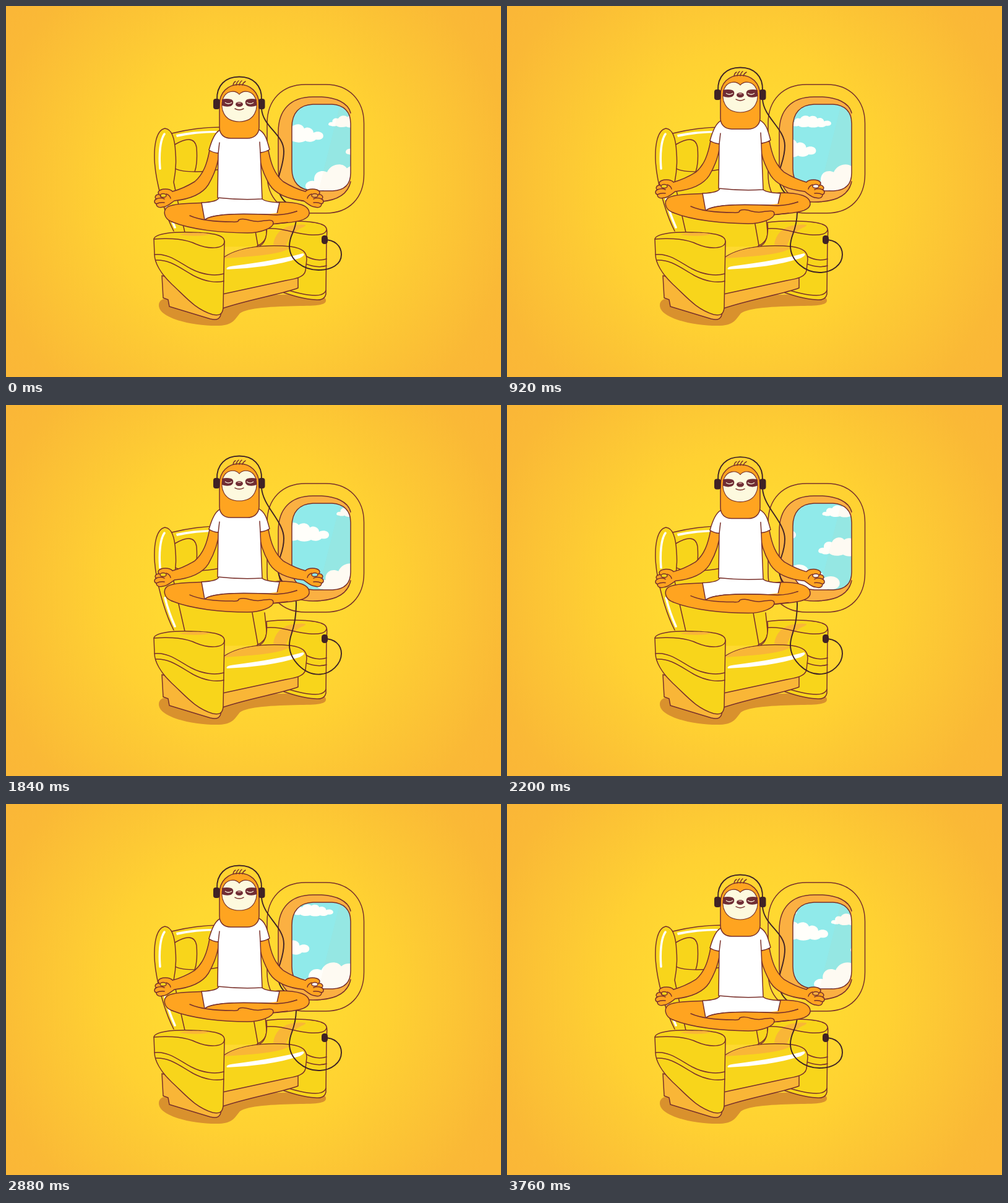
These frames come from a looping animation (800x600 px, 3800 ms). An HTML page:

```html
<!DOCTYPE html>
<html lang="en">
<head>
<meta charset="utf-8">
<title>Meditating sloth</title>
<style>
  html, body { margin: 0; width: 100%; height: 100%; overflow: hidden; background: #fab936; }
  svg { display: block; }
  .line { fill: none; stroke: #78302b; stroke-width: 1.5; stroke-linecap: round; stroke-linejoin: round; }
  .yellow { fill: #f8d51b; }
  .amber { fill: #f9b637; }
  .fur { fill: #ffa420; }
  .white { fill: #fff; }
  .dark { fill: #3f2226; }
  .cord { fill: none; stroke: #3f2226; stroke-width: 1.9; stroke-linecap: round; }
  .patch { fill: #702d35; }
  .shine { stroke: #fff; stroke-width: 3.5; }
</style>
</head>
<body>
<svg width="800" height="600" viewBox="0 0 800 600">
  <defs>
    <radialGradient id="glow" gradientUnits="userSpaceOnUse" cx="391" cy="300" r="480">
      <stop offset="0" stop-color="#ffda30"/>
      <stop offset=".3" stop-color="#ffd831"/>
      <stop offset=".48" stop-color="#ffd132"/>
      <stop offset=".6" stop-color="#fdca34"/>
      <stop offset=".9" stop-color="#fab936"/>
      <stop offset="1" stop-color="#fab737"/>
    </radialGradient>
    <path id="glass" d="M496,159H527C546,160 557,171 557,190V270C557,288 547,298 528,299H497C474,298 462,285 462,263V196C462,173 474,160 496,159Z"/>
    <clipPath id="pane"><use href="#glass"/></clipPath>
    <path id="cloud" d="M6,26C-4,26 0,15 9,17C8,8 16,5 22,8C26,-1 38,-2 42,4C48,-1 58,1 60,8C66,4 75,8 75,15C82,11 91,14 91,20C91,26 84,27 79,26C74,31 66,30 62,28C55,32 45,31 40,28C32,31 22,30 18,26C14,28 9,28 6,26Z"/>
    <g id="arm">
      <path class="line fur" fill-rule="evenodd" d="M329,233C325,255 319,272 305,284C292,292 280,297 269,300C266,296 257,295 251,297C245,299 245,303 248,305C242,304 239,310 243,312C239,314 239,319 243,320C243,325 248,327 254,325C260,325 265,320 272,315C300,312 318,303 327,289C338,270 343,255 344,238ZM249,306.500a5,3 0 1 0 10,0a5,3 0 1 0 -10,0"/>
      <path class="line" d="M243,312Q250,309 256,312M243,320Q249,317 256,318M259,304Q265,306 266,311"/>
    </g>
  </defs>

  <rect width="800" height="600" fill="url(#glow)"/>

  <g id="window">
    <path class="line" d="M484,127H517C554,127 578.500,152 578.500,190V272C578.500,311 554,335 517,335H484C446,335 422,311 422,272V190C422,152 446,127 484,127Z"/>
    <path class="line" style="fill:#fbb042" d="M557,173C553,156 532,148 510,147H496C460,147 440,168 440,204V262C440,298 461,317 496,317C528,317 552,308 557,284"/>
    <use href="#glass" fill="#90eaea"/>
    <g id="sky" fill="#fffefa" clip-path="url(#pane)"></g>
    <path clip-path="url(#pane)" fill="#e8a868" opacity=".05" d="M540,159L505,299H557V159Z"/>
    <use href="#glass" class="line"/>
  </g>

  <g id="chair">
    <path fill="#d9912d" d="M247,484C247,472 262,470 290,472L470,466C500,464 518,468 517,477C516,484 500,485 475,485C430,486 390,488 378,497C370,506 368,516 344,517C305,518 247,506 247,484Z"/>

    <path class="yellow" d="M262,206C300,197 345,195 400,196L418,338L421,366C422,380 413,386 406,389L290,390L276,330L268,300Z"/>
    <path class="line" d="M268,206C300,198 325,196 346,196M273,224C290,214 305,211 308,229C309,243 309,257 305,268M272,262C282,269 315,270 346,264M418,336L421,364C422,378 413,385 406,388M398,336L407,387"/>
    <path class="white" d="M275,208Q307,201 341,202L340,205Q307,205 276,212Z"/>
    <path class="yellow" d="M257,198C243,200 239,225 240,250C242,285 256,335 271,366L289,368L279,322L271,285C274,270 275,250 274,238C273,215 268,199 257,198Z"/>
    <path class="line" d="M271,364C256,335 242,285 240,250C239,225 243,200 257,198C268,199 273,215 274,238C275,250 274,270 271,285L279,322L289,366"/>
    <path class="line shine" d="M256,207C249,217 247,240 249,263M257,312Q263,336 273,358"/>

    <path class="line yellow" d="M421,350C445,347 500,346 514,355C520,359 519,365 518,378L517,466C515,475 508,476 500,475C480,474 462,468 441,461L410,388C418,384 423,372 421,350Z"/>
    <path class="amber" d="M432,386C435,366 450,351 484,354C486,359 463,357 452,389Z"/>
    <path class="line" d="M421,360C445,358 465,368 490,370C505,371 517,370 518,362M484,404C496,411 508,412 518,409M482,416C496,422 508,423 518,420M441,455C465,463 488,468 500,468Q514,468 517,460"/>

    <path class="line amber" d="M345,462L472,434V456C450,465 390,475 350,489Z"/>
    <path class="line yellow" d="M350,408C372,391 415,385 460,389C480,392 486,398 486,410L484,428C482,438 470,441 452,444L350,466Z"/>
    <path class="amber" d="M353,407C372,391 415,386 460,391C440,404 390,405 353,408Z"/>
    <path class="white" d="M357,426C355,423 360,421 370,420C415,414 450,408 480,400C484,402 480,405 474,408C440,419 400,424 357,426Z"/>

    <path class="line amber" d="M252,436L254,472L262,475L264,486L330,506C342,509 347,506 348,494L300,450Z"/>
    <path class="line yellow" d="M239,377C240,368 270,365 300,366C335,367 353,370 353,381L351,488C350,499 345,501 334,499C305,490 290,470 268,450C250,433 240,415 240,402Z"/>
    <path class="amber" d="M280,370C290,366 320,366 330,369C318,373 292,372 280,370Z"/>
    <path class="line" d="M239,377C270,375 290,377 307,385C328,394 352,393 353,381M240,402C262,400 276,412 299,425C318,435 338,437 352,433M242,411C265,410 280,423 303,436C322,446 340,448 352,445"/>
  </g>

  <path id="cord" class="cord"/>
  <rect class="dark" x="510" y="371" width="10" height="14" rx="4.5"/>

  <g id="sloth">
    <use href="#arm"/>
    <use href="#arm" transform="matrix(-1 0 0 1 753 0)"/>

    <g id="legs">
      <path class="line fur" d="M440,317C472,317 491,322 490,336C488,350 455,350 428,353L380,350V325Z"/>
      <path class="line fur" d="M330,318C290,319 270,320 261,325C253,331 255,344 268,349L350,358Z"/>
      <path class="line white" d="M316,318Q342,317 344,310H412Q416,317 442,318L437,340H380L321,346Z"/>
      <path class="line fur" d="M321,346C335,334 395,336 437,338Q456,337 470,332"/>
      <path class="fur" d="M321,346C335,334 395,336 437,338L470,332L455,349L428,353L380,360Z"/>
      <path class="line" d="M321,346C335,334 395,336 437,338Q456,337 470,332M428,353L455,350"/>
      <path class="line fur" d="M268,349C300,362 350,367 390,367C412,367 432,359 432,351C432,345 424,346 412,348C398,351 387,341 376,346Q376,350 366,349C345,349 315,347 297,339"/>
    </g>

    <path class="line white" d="M345,201C336,206 331,222 328,233Q334,237 343,238L342,310Q378,314 414,312L411,237Q420,236 426,232C422,218 420,206 409,200Z"/>
    <path class="line" d="M343,238L345,221M411,237L410,220"/>

    <path class="line fur" d="M345,160C345,139 359,127 377,127C395,127 409,139 409,160V196C409,208 400,214 390,214H363C352,214 345,207 345,196Z"/>
    <path class="line" style="fill:#fdf9de;stroke-width:1.1" d="M377,143C370,135 356,137 351,149C345,166 352,187 377,187C402,187 409,166 403,149C398,137 384,135 377,143Z"/>
    <g id="eye">
      <path class="patch" d="M349,151Q357,149 364,151C369,153 368,160 363,162Q356,164 349,161Z"/>
      <path d="M354,156Q359,160 365,156" fill="none" stroke="#fdf9de" stroke-width="1.3"/>
    </g>
    <use href="#eye" transform="matrix(-1 0 0 1 754 0)"/>
    <ellipse class="patch" cx="377" cy="159" rx="6" ry="4"/>
    <ellipse cx="377" cy="157" rx="3" ry="1" fill="#c99a91"/>
    <path class="line" d="M370,166Q377,170 384,166M367,128Q368,123 371,122M372,128Q373,123 376,121M377,128Q378,123 381,121M382,128Q383,124 387,122"/>

    <path class="cord" d="M341,152C340,128 355,114.500 377,114.500C399,114.500 414,128 413,152"/>
    <rect class="dark" x="335" y="150" width="10.500" height="17" rx="4"/>
    <rect class="dark" x="408" y="150" width="10.500" height="17" rx="4"/>
  </g>
</svg>
<script>
  const LOOP = 3800;
  const byId = id => document.getElementById(id);
  const sloth = byId('sloth'), cord = byId('cord');

  // x is the left edge at time 0; each cloud wraps after `span` pixels, `laps` times per loop
  const clouds = [
    { x: 521, y: 177, sx: .725, sy: .64, span: 260, laps: 1, min: 350 },
    { x: 400, y: 162, sx: .725, sy: .64, span: 260, laps: 1, min: 350 },
    { x: 422, y: 190, sx: 1, sy: 1, span: 290, laps: 2, min: 350 },
    { x: 549, y: 214, sx: 1, sy: 1, span: 290, laps: 2, min: 350 },
    { x: 484, y: 256, sx: 1.6, sy: 1.6, span: 290, laps: 4, min: 300 }
  ];
  for (const c of clouds) {
    c.el = document.createElementNS('http://www.w3.org/2000/svg', 'use');
    c.el.setAttribute('href', '#cloud');
    byId('sky').append(c.el);
  }

  const mod = (a, n) => ((a % n) + n) % n;
  const ease = x => x < .5 ? 2 * x * x : 1 - 2 * (1 - x) ** 2;

  function draw(now) {
    const p = (now % LOOP) / LOOP;
    const lift = 32 * ease(1 - Math.abs(1 - 2 * p));
    sloth.setAttribute('transform', `translate(0 ${-lift})`);

    for (const c of clouds) {
      const x = c.min + mod(c.x - c.span * c.laps * p - c.min, c.span);
      c.el.setAttribute('transform', `translate(${x} ${c.y}) scale(${c.sx} ${c.sy})`);
    }

    const mid = 235 - lift * .6, low = 296 - lift * .8, sag = 427 + lift * .27;
    cord.setAttribute('d', `M413,${166 - lift}
      C415,${196 - lift} 449,${mid - 28} 449,${mid}
      C449,${mid + 27} 436,${low - 20} 440,${low}
      C445,${low + 26} 470,${322 - lift * .8} 469,${345 - lift * .7}
      C468,365 458,370 458,388
      C458,412 482,${sag} 505,${sag}
      C526,${sag} 542,418 542,402 C542,387 530,378 515,378`);
  }

  function tick() {
    draw(performance.now());
    requestAnimationFrame(tick);
  }
  tick();
</script>
</body>
</html>
```
